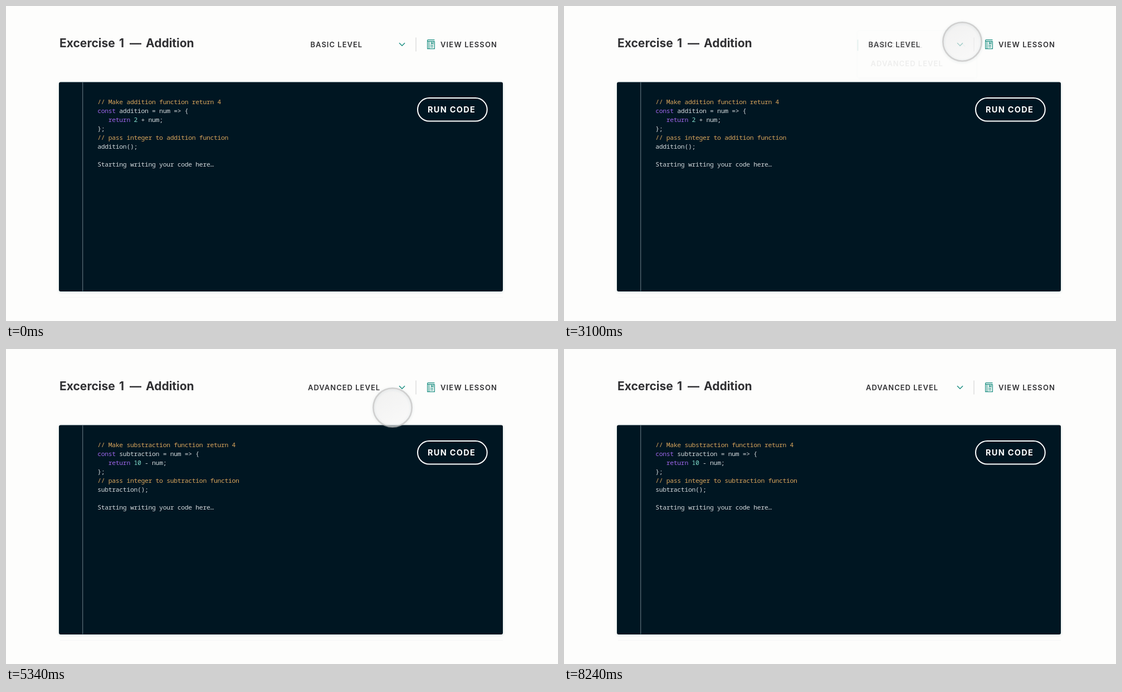
These frames come from a looping animation (991x565 px, 8260 ms). An HTML page:

```html
<!DOCTYPE html>
<html lang="en">
<head>
<meta charset="utf-8">
<title>Exercise editor</title>
<style>
  html, body { margin: 0; width: 100%; height: 100%; overflow: hidden; background: #fdfdfc; }
  svg { display: block; }
  text { font-family: Inter, sans-serif; fill: #303033; white-space: pre; }
  .title { font-size: 21px; font-weight: 700; }
  .label { font-size: 13px; font-weight: 600; letter-spacing: 1px; }
  .run { font-size: 14.5px; font-weight: 700; letter-spacing: 1.3px; fill: #fff; }
  .code text { font: 11.4px "Noto Sans Mono", monospace; letter-spacing: -.31px; fill: #d3d9dc; }
  .code .c { fill: #d9a55c; }
  .code .k { fill: #9d66ea; }
  .code .n { fill: #7fdbca; }
  .teal { fill: none; stroke: #1c8f82; stroke-width: 1.5; }
</style>
</head>
<body>
<svg width="991" height="565" viewBox="0 0 991 565">
  <defs>
    <filter id="soft" x="-20%" y="-20%" width="140%" height="140%">
      <feDropShadow dx="0" dy="1" stdDeviation="2" flood-color="#40606c" flood-opacity=".22"/>
    </filter>
    <linearGradient id="glass" x2=".6" y2="1">
      <stop stop-color="#e9e9e9" stop-opacity=".62"/>
      <stop offset="1" stop-color="#f6f6f6" stop-opacity=".62"/>
    </linearGradient>
  </defs>

  <text class="title" y="73.5"><tspan x="96">Excercise</tspan><tspan x="203">1</tspan><tspan x="222">—</tspan><tspan x="251">Addition</tspan></text>

  <text id="level" class="label" y="73.7"></text>
  <path class="teal" d="M706 66.3l5 5 5-5"/>
  <path d="M736 56.5v25" stroke="#cfcfcf"/>
  <g class="teal" style="stroke-width:1.2">
    <path d="M769.4 63.4V76.6H756.6V61.6Q756.6 60.6 758 60.6H769.4M757 63.4H769.4M759.4 63.4V76.6"/>
    <path d="M763.4 63.4v4.4l1.7-1.4 1.7 1.4V63.4M761.6 70.4h5.6M761.6 73.4h5.6"/>
  </g>
  <text class="label" x="780" y="73.7" style="letter-spacing:1.15px">VIEW LESSON</text>

  <path d="M97 522.5H892" stroke="#f5f6f6"/>
  <rect x="95" y="136.5" width="797" height="375.5" rx="3" fill="#011624" filter="url(#soft)"/>
  <path d="M137.7 137V511.5" stroke="#64767f" stroke-width="1.1"/>
  <rect x="739" y="165" width="124.7" height="41.6" rx="20.8" fill="none" stroke="#fff" stroke-width="2"/>
  <text class="run" x="757" y="191.2">RUN CODE</text>
  <g id="basicCode" class="code"></g>
  <g id="advancedCode" class="code"></g>

  <g id="menu">
    <rect x="523.5" y="41.5" width="213.5" height="84" rx="3" fill="#fff" stroke="#e6ecee" filter="url(#soft)"/>
    <path id="basicMark" d="M523.8 57.5v20" stroke="#1c8f82" stroke-width="2"/>
    <path id="advancedMark" d="M523.8 90.5v20" stroke="#1c8f82" stroke-width="2"/>
    <text id="basicItem" class="label" x="547" y="71.7">BASIC LEVEL</text>
    <text id="advancedItem" class="label" x="547" y="105.2">ADVANCED LEVEL</text>
    <path class="teal" d="M706.4 69.8l5-5 5 5"/>
  </g>

  <g id="cursor">
    <circle r="34.7" fill="url(#glass)"/>
    <circle r="34.7" fill="none" stroke="#bdbdbd" stroke-opacity=".65" stroke-width="2.6" filter="url(#soft)"/>
  </g>
</svg>
<script>
const LOOP = 8260;
const $ = id => document.getElementById(id);
const mix = (a, b, u) => a + (b - a) * u;
const progress = (t, from, to) => Math.min(1, Math.max(0, (t - from) / (to - from)));
const cubic = u => u < .5 ? 4 * u ** 3 : 1 - 4 * (1 - u) ** 3;
const fade = (t, from, to) => {
  const u = progress(t, from, to);
  return u * u * (3 - 2 * u);
};

function writeCode(group, name, task, sum) {
  const [left, sign] = sum.split(' ');
  const lines = [
    `<tspan class="c">// Make ${task} function return 4</tspan>`,
    `<tspan class="k">const</tspan> ${name} = num =&gt; {`,
    `   <tspan class="k">return</tspan> <tspan class="n">${left}</tspan> ${sign} num;`,
    '};',
    `<tspan class="c">// pass integer to ${name} function</tspan>`,
    `${name}();`,
    '',
    'Starting writing your code here…'
  ];
  group.innerHTML = lines.map((line, i) =>
    `<text x="164.2" y="${176.4 + i * 15.88}">${line}</text>`).join('');
}
writeCode($('basicCode'), 'addition', 'addition', '2 +');
writeCode($('advancedCode'), 'subtraction', 'substraction', '10 -');

// Cursor legs: start time, end time, from x, y, to x, y
const legs = [
  [1210, 2170, 778, -48, 715, 64],
  [3520, 4490, 715, 64, 694, 105],
  [6175, 7175, 694, 105, 1040, 43]
];

function draw(t) {
  const leg = legs.findLast(l => t >= l[0]) || legs[0];
  const [start, end, x0, y0, x1, y1] = leg;
  const u = cubic(progress(t, start, end));
  $('cursor').setAttribute('transform', `translate(${mix(x0, x1, u)} ${mix(y0, y1, u)})`);

  const closing = fade(t, 4740, 5040);
  const open = fade(t, 3040, 3340) - closing;
  const picked = fade(t, 3900, 4200);
  $('menu').setAttribute('opacity', open);
  $('menu').setAttribute('transform',
    `translate(${mix(4, 0, open)} ${mix(3, mix(1.5, 0, picked), open)})`);
  $('basicMark').setAttribute('opacity', 1 - picked);
  $('advancedMark').setAttribute('opacity', picked);
  $('basicItem').setAttribute('opacity', mix(1, .66, picked));
  $('advancedItem').setAttribute('opacity', mix(.66, 1, picked));

  const advanced = t >= 4700;
  $('level').textContent = advanced ? 'ADVANCED LEVEL' : 'BASIC LEVEL';
  $('level').setAttribute('x', advanced ? 542 : 546.5);
  $('basicCode').setAttribute('opacity', 1 - closing);
  $('advancedCode').setAttribute('opacity', closing);
}

function tick() {
  draw(performance.now() % LOOP);
  requestAnimationFrame(tick);
}
tick();
</script>
</body>
</html>
```
